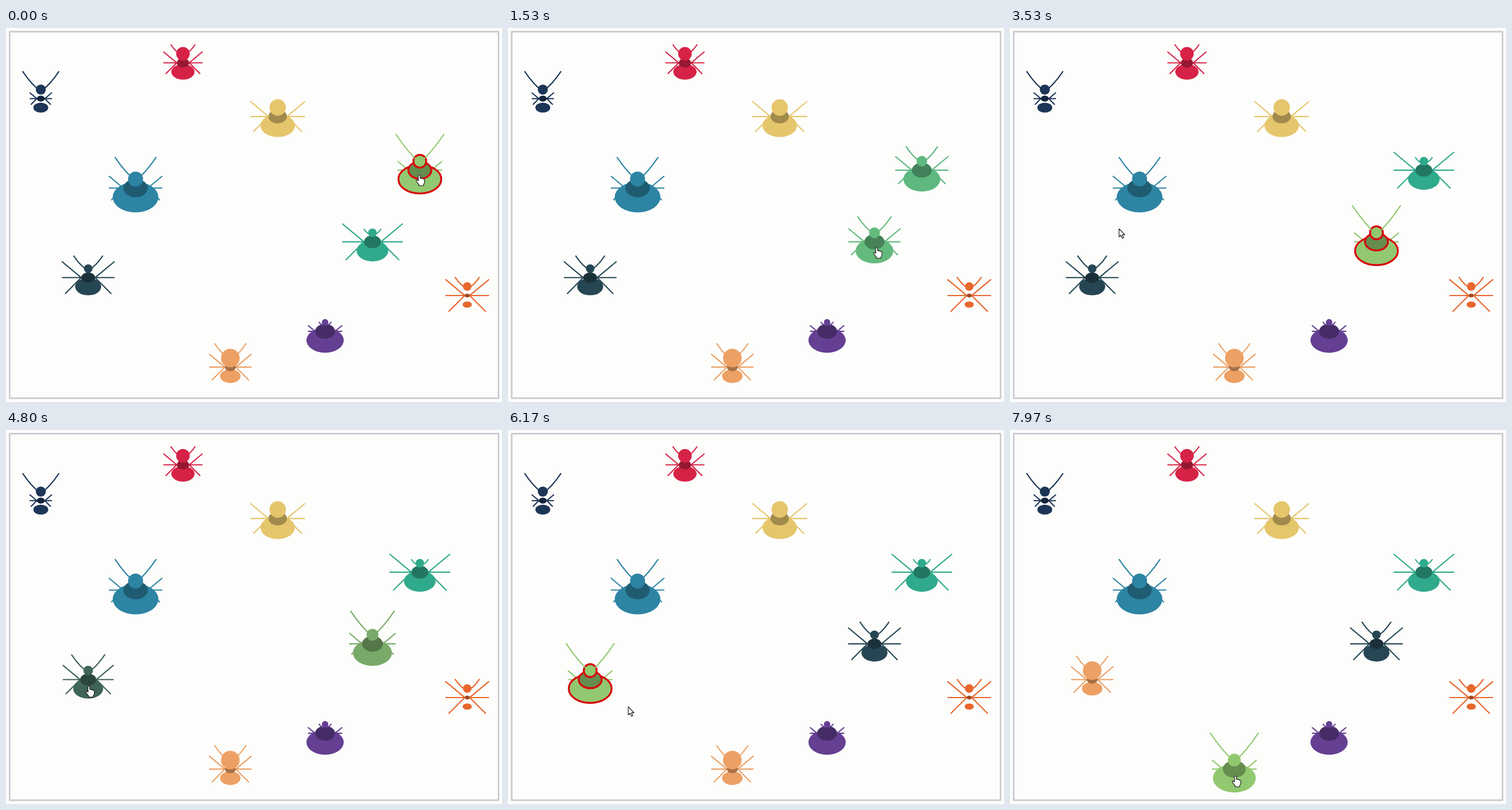
Animation, 862 px wide and 650 px high, one loop 8 s. Source, as an HTML page with a canvas:

```html
<!DOCTYPE html>
<html lang="en">
<head>
<meta charset="utf-8">
<title>Swapping bugs</title>
<style>
  html, body { margin: 0; width: 100%; height: 100%; overflow: hidden; background: #fdfdfc; }
  canvas { display: block; }
</style>
</head>
<body>
<canvas id="stage" width="862" height="650"></canvas>
<script>
const ctx = document.getElementById('stage').getContext('2d');
const LOOP = 8000;
const SWAP_TIME = 1000;
const SEGMENT_GAP = 15.7;

const hexToRgb = hex => [1, 3, 5].map(i => parseInt(hex.slice(i, i + 2), 16));

// Every size is a whole rank on its own linear scale.
const bug = (hex, head, abdomen, leg, antenna) => ({
  color: hexToRgb(hex),
  head: 5.6 + 0.62 * head,
  abdomen: 8 + 2.44 * abdomen,
  leg: 12.5 + 2.12 * leg,
  antenna: 16.4 + 3.12 * antenna
});

// Columns and rows are evenly spaced, one bug in each column.
const columns = [2, 12, 7, 0, 17, 3, 15, 10, 6, 13];
const spots = columns.map((row, column) => [60.5 + 82.34 * column, 60.5 + 31.11 * row]);
const bugs = [
  bug('#1d3557', 5, 2, 0, 10),
  bug('#264653', 3, 6, 10, 7),
  bug('#2d84a3', 12, 13, 6, 12),
  bug('#d62246', 10, 5, 5, 5),
  bug('#eda064', 17, 4, 7, 8),
  bug('#e6c66c', 14, 9, 9, 0),
  bug('#643f92', 0, 10, 0, 0),
  bug('#30aa8c', 3, 8, 12, 2),
  bug('#92c870', 9, 12, 3, 15),
  bug('#e8672d', 3, 0, 10, 5)
];

// The chosen bug is outlined at `select` and trades places at `swap`.
const rounds = [
  { select: 0, swap: 1020, from: 8, to: 7 },
  { select: 2700, swap: 4415, from: 7, to: 1 },
  { select: 5700, swap: 6800, from: 1, to: 4 }
];

const pointerStart = [718.5, 255];
const pointerMoves = [
  { start: 150, end: 850, to: [641, 381] },
  { start: 2850, end: 3500, to: [189.5, 349] },
  { start: 3550, end: 4050, to: [144.5, 445] },
  { start: 5800, end: 6170, to: [209, 481] },
  { start: 6170, end: 6650, to: [392, 601] }
];

const lerp = (a, b, p) => a + (b - a) * p;
const progress = (t, start, end) => Math.min(1, Math.max(0, (t - start) / (end - start)));
const smooth = p => p * p * (3 - 2 * p);
const cubicInOut = p => p < 0.5 ? 4 * p ** 3 : 1 - 4 * (1 - p) ** 3;
const rgb = (c, k = 1) => `rgb(${c.map(v => Math.round(v * k)).join(',')})`;

function blend(a, b, p) {
  const mixed = {};
  for (const key in a) {
    mixed[key] = key === 'color'
      ? a.color.map((v, i) => lerp(v, b.color[i], p))
      : lerp(a[key], b[key], p);
  }
  return mixed;
}

function bugsAt(t) {
  const shown = [...bugs];
  for (const { swap, from, to } of rounds) {
    const p = cubicInOut(progress(t, swap, swap + SWAP_TIME));
    const [a, b] = [shown[from], shown[to]];
    shown[from] = blend(a, b, p);
    shown[to] = blend(b, a, p);
  }
  return shown;
}

function pointerAt(t) {
  return pointerMoves.reduce((at, { start, end, to }) => {
    const p = smooth(progress(t, start, end));
    return at.map((v, i) => lerp(v, to[i], p));
  }, pointerStart);
}

function segment(y, rx, ry, fill, selected) {
  ctx.beginPath();
  ctx.ellipse(0, y, rx, ry, 0, 0, Math.PI * 2);
  ctx.fillStyle = fill;
  ctx.fill();
  if (selected) {
    ctx.strokeStyle = '#d9000a';
    ctx.lineWidth = 3.2;
    ctx.stroke();
  }
}

function limbs(color, trace) {
  ctx.beginPath();
  trace(-1);
  trace(1);
  ctx.strokeStyle = color;
  ctx.lineWidth = 2.1;
  ctx.stroke();
}

function drawBug([x, y], { color, head, abdomen, leg, antenna }, selected) {
  const main = rgb(color);
  const thorax = abdomen * 0.535;
  const rise = leg * 5 / 6;
  ctx.save();
  ctx.translate(x, y);

  limbs(main, side => {
    for (const [reach, tipY] of [[leg, -rise], [leg, 0], [rise, rise]]) {
      ctx.moveTo(side * thorax, 0);
      ctx.lineTo(side * (thorax + reach), tipY);
    }
  });
  segment(SEGMENT_GAP, abdomen, abdomen * 2 / 3, main, selected);
  segment(0, thorax, thorax * 0.75, rgb(color, 0.7), selected);
  segment(-SEGMENT_GAP, head, head, main, selected);
  limbs(main, side => {
    ctx.moveTo(0, -SEGMENT_GAP * 0.8);
    ctx.quadraticCurveTo(side * antenna / 3, -antenna / 2, side * antenna * 2 / 3, -antenna);
  });
  ctx.restore();
}

const arrow = new Path2D('M0 0V14.2L3.3 11.2L5.7 16.4L8 15.4L5.7 10.4H10Z');
const hand = new Path2D('M-2 1.5Q-.4 -1 1.2 1.5V6Q3.2 4.9 4 6.8Q5.9 5.7 6.7 7.6' +
  'Q9 7 9 9.5V13Q8.6 15.5 7.2 16.5V19H-1V17Q-3.5 14.5 -5.5 10.8Q-5.8 8.2 -3.6 9L-2 10.7Z');

function drawPointer(x, y, shape) {
  ctx.save();
  ctx.translate(x, y);
  ctx.fillStyle = '#fff';
  ctx.strokeStyle = '#111';
  ctx.lineWidth = 1.1;
  ctx.lineJoin = 'round';
  ctx.fill(shape);
  ctx.stroke(shape);
  ctx.restore();
}

function draw(t) {
  ctx.fillStyle = '#fdfdfc';
  ctx.fillRect(0, 0, 862, 650);
  ctx.strokeStyle = '#c8c8d0';
  ctx.lineWidth = 2.6;
  ctx.strokeRect(6.4, 6.4, 849.6, 637);

  const [px, py] = pointerAt(t);
  const round = rounds.find(r => t >= r.select && t < r.swap);
  let overBug = false;
  bugsAt(t).forEach((b, i) => {
    const [x, y] = spots[i];
    drawBug(spots[i], b, round?.from === i);
    const dy = (py - y - SEGMENT_GAP) * 1.5;
    overBug ||= Math.hypot(px - x, dy) < b.abdomen;
  });
  drawPointer(px, py, overBug ? hand : arrow);
}

const begin = performance.now();
function tick() {
  draw((performance.now() - begin) % LOOP);
  requestAnimationFrame(tick);
}
tick();
</script>
</body>
</html>
```
